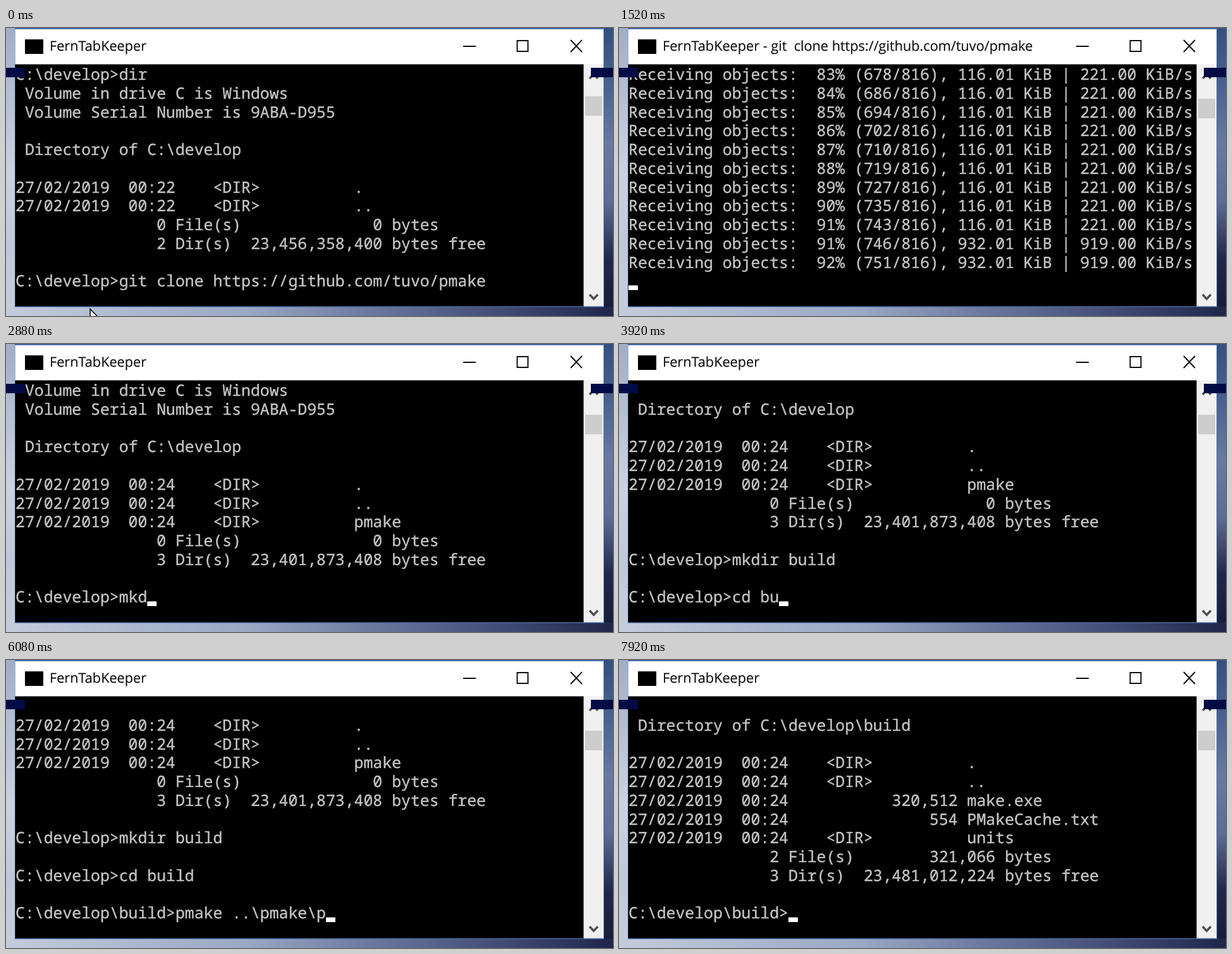
An HTML page with a canvas for the animation above (8000 ms loop, 960 px wide and 456 px high).

```html
<!DOCTYPE html>
<html lang="en">
<head>
<meta charset="utf-8">
<title>Terminal session</title>
<style>
  html, body { margin: 0; width: 960px; height: 456px; overflow: hidden; background: #000; }
  canvas, pre, .bar { position: absolute; margin: 0; }
  canvas { left: 0; top: 0; }
  pre { white-space: pre; text-rendering: geometricPrecision; }
  #title { left: 69px; top: 14px; color: #111; font: 21.7px/30px "Open Sans", "Noto Sans", sans-serif; -webkit-text-stroke: 0.2px; }
  #screen { left: 15px; top: 59px; color: #c4c4c4; font: 24.8px/29.75px "Noto Sans Mono", "DejaVu Sans Mono", monospace; -webkit-text-stroke: 0.4px; }
  .bar { top: 63px; height: 15px; background: #020b46; }
</style>
</head>
<body>
<canvas id="stage" width="960" height="456"></canvas>
<pre id="title"></pre>
<pre id="screen"></pre>
<div class="bar" style="left:0;width:30px"></div>
<div class="bar" style="left:925px;width:35px"></div>
<script>
const LOOP = 8000, ROWS = 12, CELL = 14.88, LEFT = 15;
const ctx = document.getElementById("stage").getContext("2d");
const titleEl = document.getElementById("title");
const screenEl = document.getElementById("screen");

const APP = "FernTabKeeper";
const URL_TEXT = "https://github.com/tuvo/pmake";
const HOME = "C:\\develop", BUILD = HOME + "\\build";

// ---- terminal output ----
const entry = (time, size, name) =>
  `27/02/2019  ${time}    ${size === null ? "<DIR>".padEnd(14) : size.padStart(14)} ${name}`;

function listing(path, entries, files, bytes, dirs, free) {
  return [
    " Volume in drive C is Windows", " Volume Serial Number is 9ABA-D955", "",
    " Directory of " + path, "", ...entries,
    `${files} File(s)`.padStart(24) + bytes.padStart(15) + " bytes",
    `${dirs} Dir(s)`.padStart(23) + "  " + free + " bytes free",
    "", path + ">"
  ].join("\n");
}

function receive(from, to, size = "116.01", rate = "221.00", count = 0) {
  let out = "";
  for (let p = from; p <= to; p++) {
    const n = count || Math.max(1, Math.ceil(816 * p / 100));
    out += `Receiving objects: ${String(p).padStart(3)}% (${n}/816), ${size} KiB | ${rate} KiB/s\n`;
  }
  return out;
}

const script = [];
const print = (time, text) => script.push([time, text]);
const type = (time, keys) => keys.split(",").forEach((k, i) => print(time + i * 80, k));

print(0, HOME + ">dir\n" + listing(HOME,
  [entry("00:22", null, "."), entry("00:22", null, "..")], 0, "0", 2, "23,456,358,400") +
  "git clone " + URL_TEXT);
print(720, "\n");
print(1040, "Cloning into 'pmake'...\n");
print(1120, receive(0, 12));
print(1200, receive(13, 28));
print(1280, receive(29, 45));
print(1360, receive(46, 62));
print(1440, receive(63, 78));
print(1520, receive(79, 91) + receive(91, 91, "932.01", "919.00", 746) + receive(92, 92, "932.01", "919.00"));
print(1600, receive(93, 96, "932.01", "919.00"));
print(1680, receive(97, 100, "932.01", "919.00") + ", done.\n");
print(1760, "\n" + HOME + ">");

type(2000, "d,i,r");
print(2320, "\n" + listing(HOME,
  [".", "..", "pmake"].map(n => entry("00:24", null, n)), 0, "0", 3, "23,401,873,408"));
type(2720, "m,k,d,i,r, b,ui,ld");
print(3440, "\n\n" + HOME + ">");
type(3680, "c,d, b,u,il");
print(4160, "d");
print(4400, "\n\n" + BUILD + ">");
type(4720, "p,m,a,ke, ");
print(5280, ".");
type(5440, ".,\\,p,m,a,k,e,\\,p,m");
type(6320, "a,k,e");
print(6560, "\n");
print(6640, "-- Creating makefile\n");
print(6800, "\n\n\n\n" + BUILD + ">");
type(7280, "di,r");
print(7520, "\n" + listing(BUILD, [
  entry("00:24", null, "."), entry("00:24", null, ".."),
  entry("00:24", "320,512", "make.exe"), entry("00:24", "554", "PMakeCache.txt"),
  entry("00:24", null, "units")
], 2, "321,066", 3, "23,481,012,224"));

// The cursor starts hidden and flips at each of these times.
const flips = [320, 560, 720, 2560, 2720, 3280, 3440, 4240, 4400, 5120,
  5280, 6240, 6320, 6640, 6800, 7120, 7280, 7760, 7920];

function titleAt(t) {
  if (t >= 720 && t < 1760) return `${APP} - git  clone ${URL_TEXT}`;
  if (t >= 6560 && t < 6800) return `${APP} - pmake  ..\\pmake\\pmake`;
  return APP;
}

// ---- window ----
function rect(color, x, y, w, h) {
  ctx.fillStyle = color;
  ctx.fillRect(x, y, w, h);
}

function stroke(color, width, ...lines) {
  ctx.strokeStyle = color;
  ctx.lineWidth = width;
  ctx.beginPath();
  for (const pts of lines) pts.forEach(([x, y], i) => i ? ctx.lineTo(x, y) : ctx.moveTo(x, y));
  ctx.stroke();
}

function gradient(x, y, colors) {
  const g = ctx.createLinearGradient(0, 0, x, y);
  colors.forEach((c, i) => g.addColorStop(i / (colors.length - 1), c));
  return g;
}

function drawBackdrop() {
  rect(gradient(0, 456, ["#a0adc6", "#b6c1d4", "#cbd2e0", "#bfc8d8", "#c6cedc"]), 0, 0, 15, 456);
  rect(gradient(0, 456, ["#34507f", "#4a628f", "#687a9f", "#5d6d94", "#20284a", "#161b35"]), 945, 0, 15, 456);
  rect(gradient(960, 0, ["#c3ccdb", "#aeb9d0", "#9aa8c4", "#6b799f", "#444f78", "#20264a"]), 0, 441, 960, 15);
}

function drawWindow(thumb) {
  rect("#4a6ca8", 14, 0, 932, 442);
  rect("#fff", 14.5, 2, 930.5, 56);
  rect("#000", 14.5, 57.5, 899.5, 383);
  rect("#000", 30, 18, 29, 23);
  rect("#111", 723, 28, 20, 2);
  ctx.strokeStyle = "#111";
  ctx.lineWidth = 2;
  ctx.strokeRect(808.5, 20, 17, 17);
  stroke("#111", 2, [[893, 19], [911, 38]], [[911, 19], [893, 38]]);
  rect("#f0f0f0", 913.5, 57.5, 31.5, 383);
  rect("#cdcdcd", 916, thumb, 27, 31);
  stroke("#505050", 3.5, [[923, 80], [929.5, 73], [936, 80]], [[923, 422], [929.5, 429], [936, 422]]);
}

function drawPointer() {
  ctx.beginPath();
  ctx.moveTo(133, 445);
  ctx.lineTo(133, 470);
  ctx.lineTo(150, 462);
  ctx.closePath();
  ctx.fillStyle = "#fff";
  ctx.fill();
  ctx.strokeStyle = "#000";
  ctx.lineWidth = 1.5;
  ctx.stroke();
}

function setText(el, text) {
  if (el.textContent !== text) el.textContent = text;
}

function render(t) {
  const rows = script.filter(([at]) => at <= t).map(s => s[1]).join("").split("\n").slice(-ROWS);
  setText(titleEl, titleAt(t));
  setText(screenEl, rows.join("\n"));

  drawBackdrop();
  drawWindow(t < 1120 ? 108 : 112);
  if (flips.filter(at => at <= t).length % 2) {
    const col = rows[rows.length - 1].length;
    rect("#fff", LEFT + col * CELL, 407.5, CELL, 7.5);
  }
  if (t < 80) drawPointer();
}

const start = performance.now();
function tick() {
  render((performance.now() - start) % LOOP);
  requestAnimationFrame(tick);
}
tick();
</script>
</body>
</html>
```
